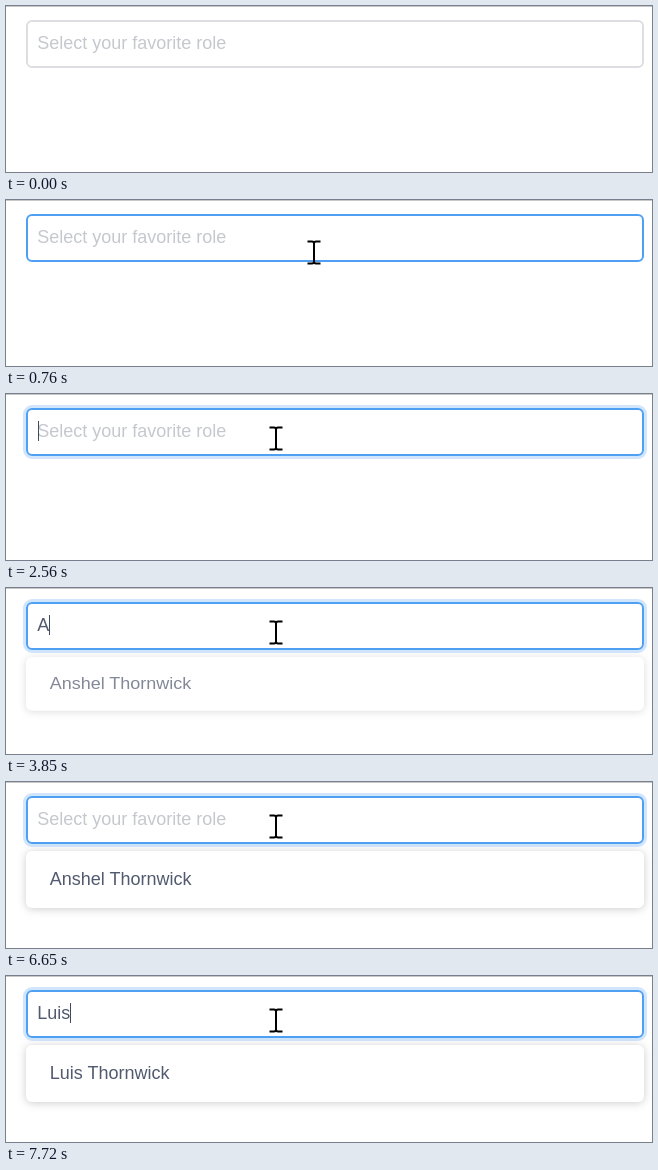
Animation, 646 px wide and 166 px high, one loop 8000 ms. Source, as an HTML page:

```html
<!DOCTYPE html>
<html lang="en">
<head>
<meta charset="utf-8">
<title>Autocomplete input</title>
<style>
  html, body { margin: 0; width: 100%; height: 100%; overflow: hidden; background: #fff; }
  svg { display: block; width: 100%; height: 100%; }
  text { font: 18px "Liberation Sans", Arial, sans-serif; fill: #515a6e; white-space: pre; }
  #hint { fill: #c5c8ce; }
  #panel { fill: #fff; filter: drop-shadow(0 1.5px 4.5px rgba(0, 0, 0, .2)); }
</style>
</head>
<body>
<svg viewBox="0 0 646 166">
  <rect width="646" height="1" fill="#c8c8c8"/>
  <rect id="ring" x="18.5" y="12.5" width="621" height="51" rx="7.5" fill="none" stroke="#2d8cf0" stroke-width="3"/>
  <rect id="field" x="21" y="15" width="616" height="46" rx="5" fill="#fff" stroke-width="2"/>
  <text id="hint" x="31.2" y="43">Select your favorite role</text>
  <text id="value" x="31.2" y="43"></text>
  <rect id="caret" y="27" width="1" height="20" fill="#414a5e"/>
  <g id="drop">
    <rect id="panel" x="20" y="69" width="618" rx="6"/>
    <text id="item0" x="43.7" y="103"></text>
    <text id="item1" x="43.7" y="145"></text>
  </g>
  <path id="arrow" d="M.5 .5V22.5L5.6 17.8L9.4 26.3L13 24.7L9.3 16.5H16.3Z" fill="#fff" stroke="#000"/>
  <path id="beam" d="M-6.5 -11.5H-2Q0 -11.5 0 -9.5V8.5Q0 10.5 -2 10.5H-6.5M6.5 -11.5H2Q0 -11.5 0 -9.5M0 8.5Q0 10.5 2 10.5H6.5" fill="none" stroke="#000" stroke-width="2"/>
</svg>
<script>
const LOOP = 8000;
const el = id => document.getElementById(id);
const [ring, field, hint, value, caret, drop, panel, item0, item1, arrow, beam] =
  ["ring", "field", "hint", "value", "caret", "drop", "panel", "item0", "item1", "arrow", "beam"].map(el);

// Held states: [start, ...data]
const pointer = [
  [0, null],
  [130, arrow, 466, 148], [210, arrow, 438, 110], [290, arrow, 410, 76],
  [440, arrow, 392, 66], [520, beam, 366, 58], [600, beam, 335, 54],
  [680, beam, 315, 53], [760, beam, 308, 53],
  [910, beam, 291, 49], [990, beam, 276, 46], [1070, beam, 270, 45]
];
const typed = [
  [0, ""], [3620, "A"], [3925, "An"], [4000, "Ana".slice(0, 2) + "s"],
  [5500, "An"], [5650, "A"], [6110, ""],
  [7030, "L"], [7420, "Lu"], [7570, "Lui"], [7720, "Luis"]
];
const results = [
  [0, ["Anshel Thornwick"]],
  [7030, ["Leon Thornwick", "Luis Thornwick"]],
  [7420, ["Luis Thornwick"]]
];
const caretOn = [
  [0, false], [1530, true], [1980, false], [2560, true], [3070, false],
  [3620, true], [4550, false], [5100, true], [6650, false], [7030, true]
];

const at = (list, t) => list.findLast(s => s[0] <= t);
const hold = (t, start, step) => start + Math.floor((t - start) / step) * step;
const ease = (t, start, length) => {
  const p = Math.min(1, Math.max(0, (t - start) / length));
  return p * p * (3 - 2 * p);
};
const show = (node, on) => node.setAttribute("visibility", on ? "visible" : "hidden");
const mix = (a, b, p) => `rgb(${a.map((v, i) => Math.round(v + (b[i] - v) * p))})`;

function draw(t) {
  const hover = ease(hold(t, 440, 80), 480, 200);
  field.setAttribute("stroke", mix([220, 222, 226], [79, 160, 243], hover));
  ring.setAttribute("opacity", .22 * ease(hold(t, 1530, 75), 1475, 200));

  const text = at(typed, t)[1];
  value.textContent = text;
  show(hint, !text);
  caret.setAttribute("x", text ? Math.floor(31.2 + value.getComputedTextLength()) : 32);
  show(caret, at(caretOn, t)[1]);

  const open = ease(hold(t, 3620, 76), 3655, 300);
  const names = at(results, t)[1];
  show(drop, open > 0);
  drop.setAttribute("opacity", open);
  drop.setAttribute("transform", `translate(0 69) scale(1 ${.8 + .2 * open}) translate(0 -69)`);
  panel.setAttribute("height", 15 + 42 * names.length);
  item0.textContent = names[0];
  item1.textContent = names[1] || "";

  const [, shape, x, y] = at(pointer, t);
  for (const node of [arrow, beam]) show(node, node === shape);
  if (shape) shape.setAttribute("transform", `translate(${x} ${y})`);
}

const start = performance.now();
function tick() {
  draw((performance.now() - start) % LOOP);
  requestAnimationFrame(tick);
}
tick();
</script>
</body>
</html>
```
